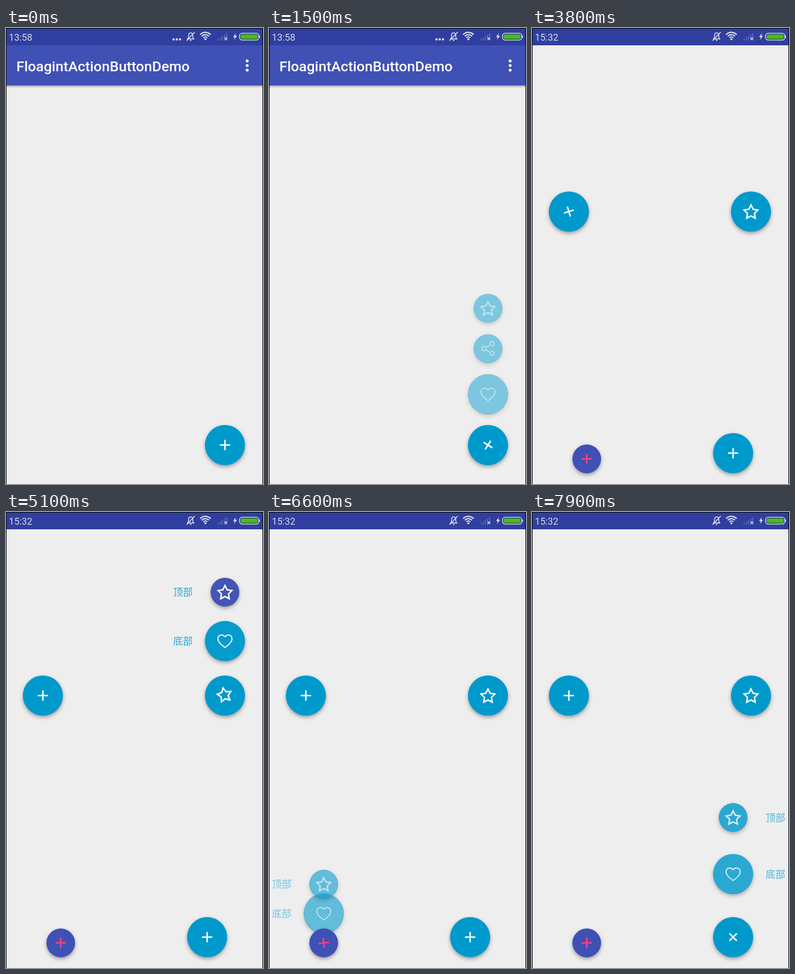
An HTML page with a canvas that plays this animation: 446 px wide and 790 px high, repeating every 8 s.

```html
<!DOCTYPE html>
<html lang="en">
<head>
<meta charset="utf-8">
<title>Floating action menus</title>
<style>
  html, body { margin: 0; width: 100%; height: 100%; overflow: hidden; background: #eee; }
  canvas { display: block; width: 446px; height: 790px; }
</style>
</head>
<body>
<canvas id="stage"></canvas>
<script>
const W = 446, H = 790, LOOP = 8000, CUT = 2200;
const BLUE = '#0099cc', INDIGO = '#3f51b5', PINK = '#ff4081', WHITE = '#fff';
const BIG = 34.8, MINI = 24.9, GAP = 27;

const canvas = document.getElementById('stage');
const ctx = canvas.getContext('2d');
const ratio = window.devicePixelRatio || 1;
canvas.width = W * ratio;
canvas.height = H * ratio;

// Each phase: start time, duration, whether the menu opens.
const starItem = { icon: star, r: MINI, color: BLUE, label: '顶部' };
const heartItem = { icon: heart, r: BIG, color: BLUE, label: '底部' };
const menus = [
  { scene: 0, x: 380, y: 722.5, r: BIG, color: BLUE, icon: plus, angle: 135,
    items: [{ icon: heart, r: BIG, color: BLUE }, { icon: share, r: MINI, color: BLUE }, { icon: star, r: MINI, color: BLUE }],
    phases: [[200, 300, true], [795, 300, false], [1418, 300, true]] },
  { scene: 1, x: 64, y: 318, r: BIG, color: BLUE, icon: plus, angle: 135,
    items: [{ icon: heart, r: BIG, color: BLUE }, { icon: share, r: MINI, color: BLUE }],
    phases: [[2348, 600, true], [3320, 800, false]] },
  { scene: 1, x: 380, y: 318, r: BIG, color: BLUE, icon: star, angle: 135, labelX: 307,
    items: [heartItem, { ...starItem, color: INDIGO }],
    phases: [[4290, 400, true], [5098, 800, false]] },
  { scene: 1, x: 95, y: 746.5, r: MINI, color: INDIGO, icon: plus, ink: PINK, angle: 135, labelX: 22,
    items: [heartItem, starItem],
    phases: [[5990, 300, true], [6533, 800, false]] },
  { scene: 1, x: 349, y: 736.5, r: BIG, color: BLUE, icon: plus, angle: 120, labelX: 422.5,
    items: [heartItem, starItem],
    phases: [[7497, 700, true]] }
];

const overshoot = p => 1 + 2 * (p - 1) ** 2 + 3 * (p - 1) ** 3;

function menuState(menu, time) {
  const phase = menu.phases.filter(([start]) => start <= time).pop();
  if (!phase) return { shift: 0, alpha: 0, turn: 0 };
  const [start, duration, opening] = phase;
  const p = Math.min(1, (time - start) / duration);
  if (opening) return { shift: overshoot(p), alpha: 1 - (1 - p) ** 2, turn: overshoot(p) };
  const left = (1 - p) ** 6;
  return { shift: left, alpha: left, turn: 1 - overshoot(p) };
}

function strokePath(width, draw) {
  ctx.lineWidth = width;
  ctx.beginPath();
  draw();
  ctx.stroke();
}

function line(...points) {
  ctx.moveTo(points[0], points[1]);
  for (let i = 2; i < points.length; i += 2) ctx.lineTo(points[i], points[i + 1]);
}

function ring(x, y, r) {
  ctx.moveTo(x + r, y);
  ctx.arc(x, y, r, 0, 7);
}

function plus() {
  strokePath(2.5, () => { line(-9, 0, 9, 0); line(0, -9, 0, 9); });
}

function star() {
  strokePath(2.5, () => {
    for (let i = 0; i < 10; i++) {
      const a = i * Math.PI / 5, r = i % 2 ? 6.4 : 12.6;
      ctx.lineTo(r * Math.sin(a), 1.2 - r * Math.cos(a));
    }
    ctx.closePath();
  });
}

function heart() {
  strokePath(1.8, () => {
    ctx.moveTo(0, -7);
    ctx.bezierCurveTo(3, -12.5, 12.2, -11.5, 12.2, -3.5);
    ctx.bezierCurveTo(12.2, 2, 6, 6.5, 0, 11.2);
    ctx.bezierCurveTo(-6, 6.5, -12.2, 2, -12.2, -3.5);
    ctx.bezierCurveTo(-12.2, -11.5, -3, -12.5, 0, -7);
  });
}

function share() {
  strokePath(1.9, () => {
    ring(-7, 0, 3.6);
    ring(7.3, -8.6, 3.6);
    ring(7.3, 8.4, 3.6);
    line(4.1, -6.7, -3.8, -2);
    line(4.1, 6.5, -3.8, 2);
  });
}

function button(x, y, { r, color, icon, ink = WHITE }, alpha = 1, angle = 0) {
  ctx.save();
  ctx.globalAlpha = alpha;
  ctx.translate(x, y);
  ctx.fillStyle = color;

  // The shadow stays outside the disc, so faded discs keep a clean fill.
  ctx.save();
  ctx.beginPath();
  ctx.rect(-60, -60, 120, 120);
  ring(0, 0, r - .5);
  ctx.clip('evenodd');
  ctx.shadowColor = 'rgba(0,0,0,.4)';
  ctx.shadowBlur = 7 * ratio;
  ctx.shadowOffsetY = 3 * ratio;
  ctx.beginPath();
  ring(0, 0, r - .5);
  ctx.fill();
  ctx.restore();

  ctx.beginPath();
  ring(0, 0, r);
  ctx.fill();
  ctx.rotate(angle * Math.PI / 180);
  ctx.strokeStyle = ink;
  icon();
  ctx.restore();
}

function drawMenu(menu, time) {
  const { shift, alpha, turn } = menuState(menu, time);
  let distance = 0, previous = menu.r;
  if (alpha > .004) for (const item of menu.items) {
    distance += previous + item.r + GAP;
    previous = item.r;
    const y = menu.y - distance * shift;
    button(menu.x, y, item, alpha);
    if (item.label) {
      ctx.globalAlpha = alpha;
      text(item.label, menu.labelX, y + 6.5, '17px "Noto Sans CJK SC", "Noto Sans CJK", sans-serif', '#22a7d3', 'center');
      ctx.globalAlpha = 1;
    }
  }
  button(menu.x, menu.y, menu, 1, menu.angle * turn);
}

function text(string, x, y, font, color, align = 'left') {
  ctx.font = font;
  ctx.fillStyle = color;
  ctx.textAlign = align;
  ctx.fillText(string, x, y);
}

function box(x, y, w, h, color) {
  ctx.fillStyle = color;
  ctx.fillRect(x, y, w, h);
}

function statusBar(clock, busy) {
  const pale = '#e3e5f3';
  box(0, 0, W, 30, '#303f9f');
  text(clock, 5, 21.5, '16.3px Roboto, sans-serif', '#d6d9ec');
  if (busy) for (let i = 0; i < 3; i++) box(289 + i * 5.6, 18, 3.4, 3.4, pale);
  ctx.strokeStyle = pale;

  // Muted bell
  strokePath(1.4, () => {
    line(314, 19, 327, 19);
    ctx.moveTo(316, 18.5);
    ctx.bezierCurveTo(318, 15, 315, 8.5, 320.5, 8.5);
    ctx.bezierCurveTo(326, 8.5, 323, 15, 325, 18.5);
    line(319, 21.5, 322, 21.5);
    line(313.5, 22, 327.5, 7);
  });

  // Wi-Fi
  for (const r of [4.5, 8.5, 12.5])
    strokePath(2.1, () => ctx.arc(346, 20, r, -Math.PI * .76, -Math.PI * .24));
  ctx.fillStyle = pale;
  ctx.beginPath();
  ring(346, 19.5, 1.8);
  ctx.fill();

  // No signal
  for (let i = 0; i < 5; i++) box(367 + i * 3.7, 19 - i * 2.5, 2.2, 2.5 + i * 2.5, '#5662b0');
  box(377, 15, 9, 7, '#303f9f');
  strokePath(1.3, () => { line(379, 16, 384, 21); line(384, 16, 379, 21); });

  // Charging battery
  ctx.fillStyle = pale;
  ctx.beginPath();
  line(399, 9, 394, 15.5, 397, 15.5, 395.5, 20.5, 401, 13.7, 397.8, 13.7);
  ctx.fill();
  ctx.fillStyle = '#4dbd0d';
  ctx.beginPath();
  ctx.roundRect(407.2, 11.2, 29.6, 7.6, 2.5);
  ctx.fill();
  strokePath(1.3, () => ctx.roundRect(405.2, 9.2, 33.6, 11.6, 4.5));
  box(439, 13, 1.5, 4, pale);
}

function toolbar() {
  const shade = ctx.createLinearGradient(0, 99, 0, 104);
  shade.addColorStop(0, 'rgba(0,0,0,.3)');
  shade.addColorStop(1, 'rgba(0,0,0,0)');
  box(0, 99, W, 5, shade);
  box(0, 30, W, 69.5, INDIGO);
  text('FloagintActionButtonDemo', 18, 75, '500 24.8px Roboto, sans-serif', WHITE);
  ctx.beginPath();
  for (const y of [57, 65, 73]) ring(418.5, y, 2.5);
  ctx.fill();
}

function draw(time) {
  const scene = time < CUT ? 0 : 1;
  ctx.setTransform(ratio, 0, 0, ratio, 0, 0);
  box(0, 0, W, H, '#eeeeee');
  if (scene === 0) toolbar();
  statusBar(scene ? '15:32' : '13:58', scene === 0);
  for (const menu of menus) if (menu.scene === scene) drawMenu(menu, time);
  box(0, 0, W, 1, '#000');
  box(0, 0, 1, H, '#000');
  box(W - 1, 0, 1, H, '#000');
}

const began = performance.now();
function tick() {
  draw((performance.now() - began) % LOOP);
  requestAnimationFrame(tick);
}
tick();
</script>
</body>
</html>
```
